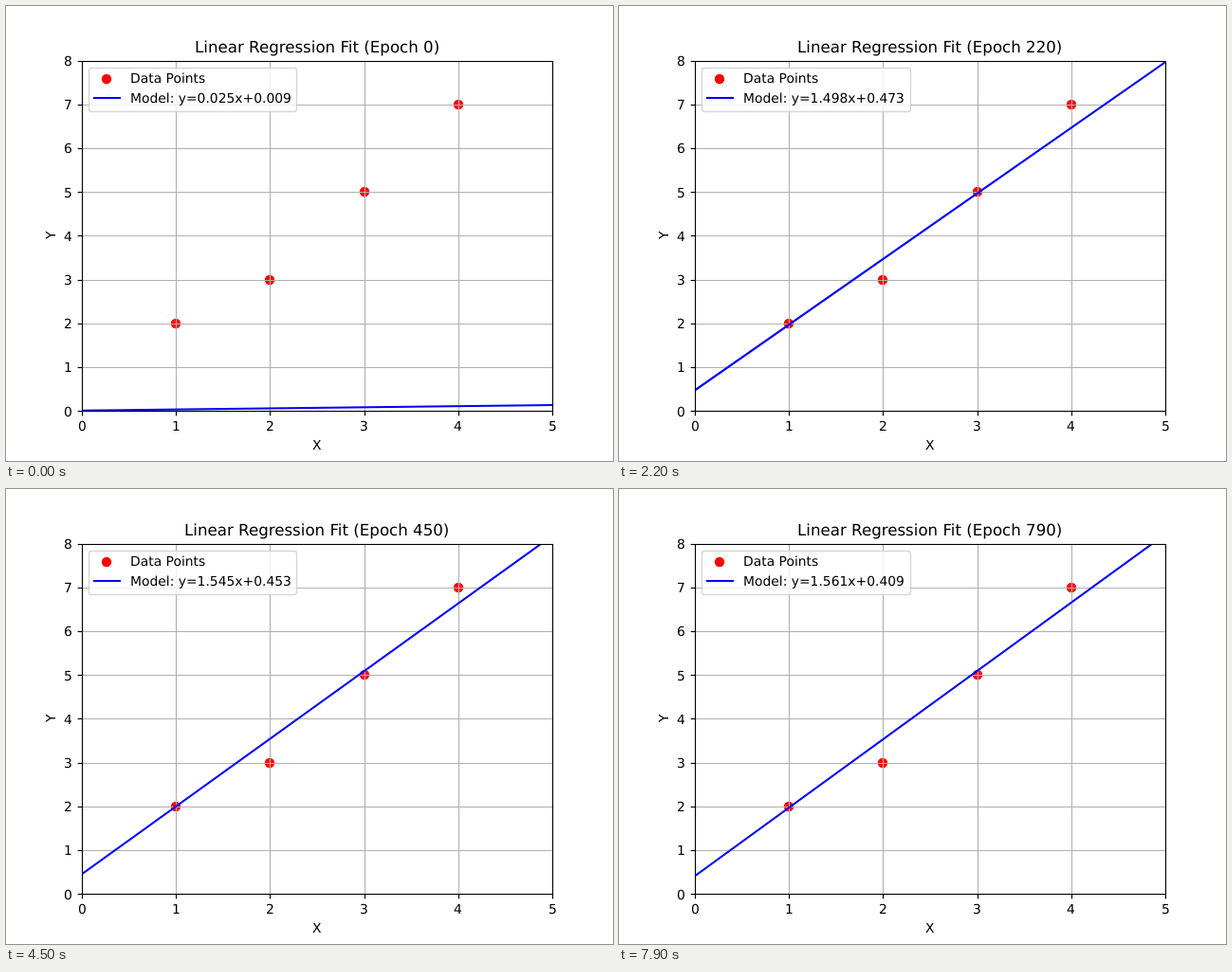
Animation, 640 px wide and 480 px high, one loop 8000 ms. Source, as an HTML page with a canvas:

```html
<!DOCTYPE html>
<html lang="en">
<head>
<meta charset="utf-8">
<title>Linear Regression Fit</title>
<style>
html, body { margin: 0; width: 100%; height: 100%; overflow: hidden; background: #fff; }
canvas { display: block; width: 640px; height: 480px; }
</style>
</head>
<body>
<canvas id="plot" width="640" height="480"></canvas>
<script>
const ctx = document.getElementById('plot').getContext('2d');
const POINTS = [[1, 2], [2, 3], [3, 5], [4, 7]];
const STEP_MS = 100, FRAMES = 80, EPOCHS_PER_FRAME = 10, RATE = 0.001;
const PT = 100 / 72;
const LEFT = 80, RIGHT = 576, TOP = 57.6, BOTTOM = 427.2;
const THIN = 0.8 * PT, THICK = 1.5 * PT, TICK = 3.5 * PT;

const px = x => LEFT + x * (RIGHT - LEFT) / 5;
const py = y => BOTTOM - y * (BOTTOM - TOP) / 8;
const snap = v => Math.floor(v + 0.5) + 0.5;

// Gradient descent on the mean squared error, in single precision
function train() {
  const fits = [];
  let w = 0, b = 0;
  for (let epoch = 0; epoch < FRAMES * EPOCHS_PER_FRAME; epoch++) {
    let dw = 0, db = 0;
    for (const [x, y] of POINTS) {
      const err = w * x + b - y;
      dw += 2 * err * x / POINTS.length;
      db += 2 * err / POINTS.length;
    }
    w = Math.fround(w - RATE * dw);
    b = Math.fround(b - RATE * db);
    if (epoch % EPOCHS_PER_FRAME === 0) fits.push({ epoch, w, b });
  }
  return fits;
}
const fits = train();

function line(x0, y0, x1, y1, color, width, cap = 'butt') {
  ctx.strokeStyle = color;
  ctx.lineWidth = width;
  ctx.lineCap = cap;
  ctx.beginPath();
  ctx.moveTo(x0, y0);
  ctx.lineTo(x1, y1);
  ctx.stroke();
}

function dot(x, y) {
  ctx.fillStyle = '#f00';
  ctx.beginPath();
  ctx.arc(x, y, 3 * PT + THICK / 2, 0, 2 * Math.PI);
  ctx.fill();
}

// align: 0 left, 0.5 centre, 1 right
function text(str, x, y, align = 0, size = 10) {
  ctx.font = `${size * PT}px "DejaVu Sans", sans-serif`;
  ctx.textRendering = 'geometricPrecision';
  ctx.fillStyle = '#000';
  ctx.fillText(str, Math.round(x - align * ctx.measureText(str).width), y);
}

function drawAxes() {
  const l = snap(LEFT), r = snap(RIGHT), t = snap(TOP), b = snap(BOTTOM);
  for (let x = 0; x <= 5; x++) {
    line(snap(px(x)), b, snap(px(x)), b + TICK, '#000', THIN);
    text(String(x), px(x), 448, 0.5);
  }
  for (let y = 0; y <= 8; y++) {
    line(l, snap(py(y)), l - TICK, snap(py(y)), '#000', THIN);
    text(String(y), LEFT - 2 * TICK, Math.round(py(y) + 5.35), 1);
  }
  ctx.strokeStyle = '#000';
  ctx.lineWidth = THIN;
  ctx.strokeRect(l, t, r - l, b - t);
  text('X', 328, 468, 0.5);
  ctx.save();
  ctx.translate(52, 242);
  ctx.rotate(-Math.PI / 2);
  text('Y', 0, 0, 0.5);
  ctx.restore();
}

function drawLegend(label) {
  // The box hugs the label; 2 and 5 are slightly narrower digits
  const narrow = (label.match(/[25]/g) || []).length >= 2;
  const x0 = 87.5, y0 = 65.5, x1 = narrow ? 306.5 : 307.5, y1 = 111.5, r = 2.8;
  ctx.save();
  ctx.globalAlpha = 0.8;
  ctx.beginPath();
  ctx.moveTo(x0 + r, y0);
  ctx.lineTo(x1 - r, y0);
  ctx.quadraticCurveTo(x1, y0, x1, y0 + r);
  ctx.lineTo(x1, y1 - r);
  ctx.quadraticCurveTo(x1, y1, x1 - r, y1);
  ctx.lineTo(x0 + r, y1);
  ctx.quadraticCurveTo(x0, y1, x0, y1 - r);
  ctx.lineTo(x0, y0 + r);
  ctx.quadraticCurveTo(x0, y0, x0 + r, y0);
  ctx.closePath();
  ctx.fillStyle = '#fff';
  ctx.fill();
  ctx.strokeStyle = '#ccc';
  ctx.lineWidth = PT;
  ctx.stroke();
  ctx.restore();
  dot(106, 77);
  text('Data Points', 131, 81);
  line(93, 97, 120, 97, '#00f', THICK, 'square');
  text(label, 131, 102);
}

function draw({ epoch, w, b }) {
  ctx.fillStyle = '#fff';
  ctx.fillRect(0, 0, 640, 480);

  ctx.save();
  ctx.beginPath();
  ctx.rect(80, 58, 496, 369);
  ctx.clip();
  for (const [x, y] of POINTS) dot(Math.round(px(x)), Math.round(py(y)));
  for (let x = 0; x <= 5; x++) line(snap(px(x)), TOP, snap(px(x)), BOTTOM, '#b0b0b0', THIN);
  for (let y = 0; y <= 8; y++) line(LEFT, snap(py(y)), RIGHT, snap(py(y)), '#b0b0b0', THIN);
  line(px(0), py(b), px(5), py(5 * w + b), '#00f', THICK, 'square');
  ctx.restore();

  drawAxes();
  text(`Linear Regression Fit (Epoch ${epoch})`, 328, 49, 0.5, 12);
  drawLegend(`Model: y=${w.toFixed(3)}x+${b.toFixed(3)}`);
}

const start = performance.now();
function tick() {
  const t = Math.max(0, performance.now() - start);
  draw(fits[Math.floor(t / STEP_MS) % FRAMES]);
  requestAnimationFrame(tick);
}
tick();
</script>
</body>
</html>
```
